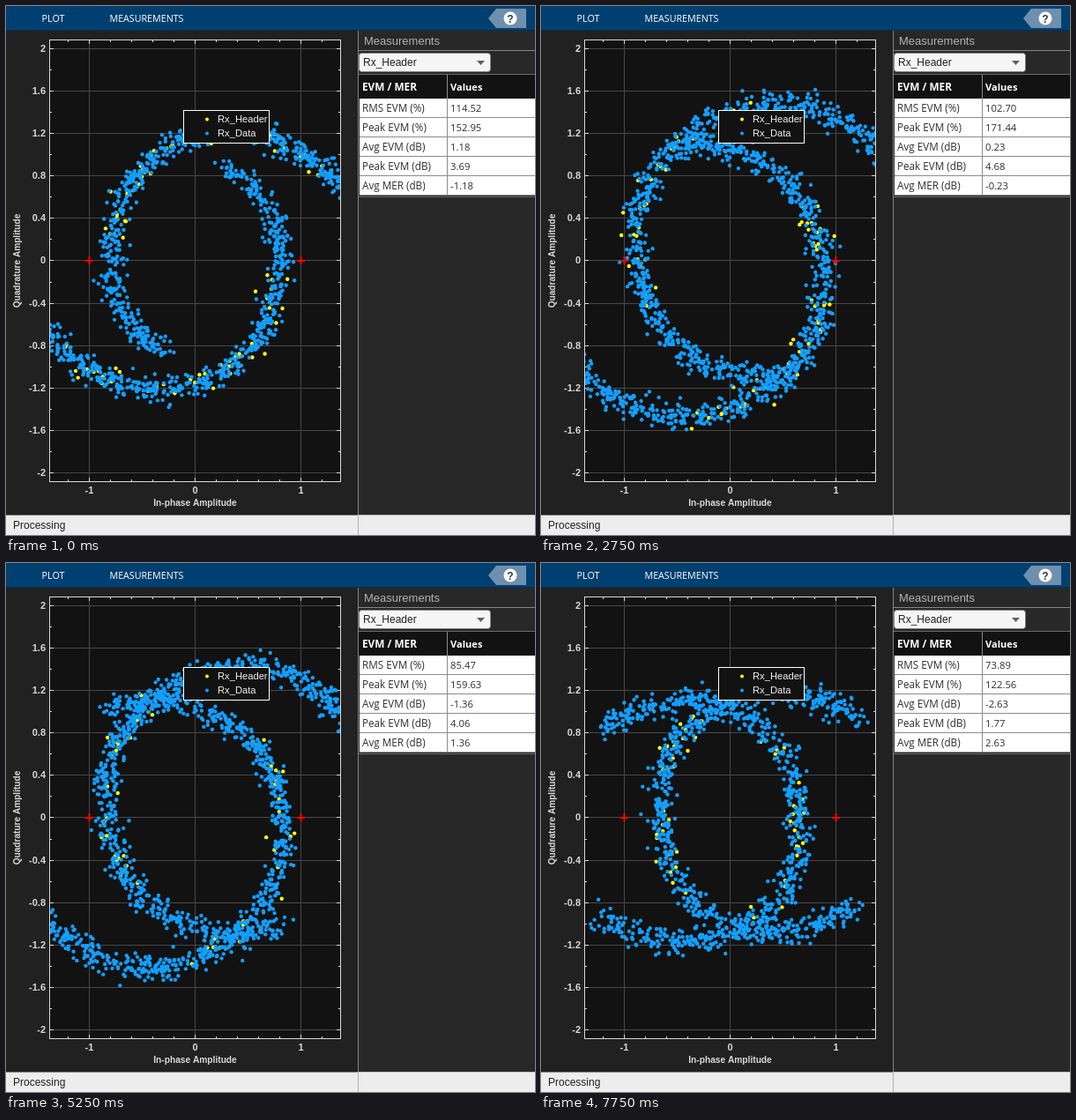
Write an HTML page with a canvas that moves like this. It is 600 by 600 pixels and loops after 8000 ms.

```html
<!DOCTYPE html>
<html lang="en">
<head>
<meta charset="utf-8">
<title>Constellation scope</title>
<style>
html, body { margin: 0; width: 100%; height: 100%; overflow: hidden; background: #282828; }
canvas { display: block; }
</style>
</head>
<body>
<canvas id="stage" width="600" height="600"></canvas>
<script>
const ctx = document.getElementById('stage').getContext('2d');
const ARIAL = '"Liberation Sans", Arial, sans-serif';
const UI = '"Open Sans", "Noto Sans", sans-serif';
const BLUE = '#139fff', YELLOW = '#ffff11', LIGHT = '#d9d9d9';
const STEP = 250, LOOP = 8000, BURST = 289;
const CX = 214.5, CY = 288.45, UNIT = 120.3;

// time, RMS EVM, peak EVM, last phase in degrees, then radii at 20, 60 ... 340 degrees
const KEYS = [
  [0,    114.52, 152.95, 253, 191, 162, 134, 107, 95, 103, 111, 130, 150],
  [1000, 112.47, 162.86, 275, 203, 179, 144, 115, 99, 104, 119, 138, 158],
  [2000, 108.53, 170.71, 288, 215, 190, 153, 122, 103, 107, 123, 145, 168],
  [3250, 98.81,  171.93, 302, 225, 201, 161, 128, 107, 108, 121, 147, 172],
  [4250, 90.98,  173.05, 303, 219, 197, 159, 125, 105, 106, 121, 150, 177],
  [6000, 81.34,  149.56, 316, 211, 185, 146, 112, 94, 99, 118, 149, 188],
  [7750, 73.89,  122.56, 325, 205, 160, 124, 95, 78, 88, 114, 148, 188]
];

function stateAt(time) {
  let i = 0;
  while (i < KEYS.length - 2 && time >= KEYS[i + 1][0]) i++;
  const a = KEYS[i], b = KEYS[i + 1];
  const k = (time - a[0]) / (b[0] - a[0]);
  const [, rms, peak, end, ...radii] = a.map((v, j) => v + (b[j] - v) * k);
  return { rms, peak, end, radii };
}

// Catmull-Rom through the radii
function radiusAt(radii, phase) {
  const u = (phase - 20) / 40;
  const i = Math.max(0, Math.min(radii.length - 2, Math.floor(u)));
  const f = u - i, p1 = radii[i], p2 = radii[i + 1];
  const p0 = radii[i - 1] ?? 2 * p1 - p2, p3 = radii[i + 2] ?? 2 * p2 - p1;
  return p1 + f / 2 * (p2 - p0 + f * (2 * p0 - 5 * p1 + 4 * p2 - p3 + f * (3 * (p1 - p2) + p3 - p0)));
}

function randomFrom(seed) {
  return () => {
    seed = (seed + 0x6D2B79F5) | 0;
    let h = Math.imul(seed ^ seed >>> 15, 1 | seed);
    h = h + Math.imul(h ^ h >>> 7, 61 | h) ^ h;
    return ((h ^ h >>> 14) >>> 0) / 4294967296;
  };
}

function rect(x, y, w, h, fill) {
  ctx.fillStyle = fill;
  ctx.fillRect(x, y, w, h);
}

function text(str, x, y, font, fill, align = 'left') {
  ctx.font = font;
  ctx.fillStyle = fill;
  ctx.textAlign = align;
  ctx.fillText(str, x, y);
}

function dot(x, y, fill, r = 2.2) {
  ctx.fillStyle = fill;
  ctx.beginPath();
  ctx.arc(x, y, r, 0, Math.PI * 2);
  ctx.fill();
}

function polygon(points, fill) {
  ctx.fillStyle = fill;
  ctx.beginPath();
  points.forEach(([x, y]) => ctx.lineTo(x, y));
  ctx.fill();
}

function drawToolbar() {
  rect(0, 0, 600, 28, '#004071');
  rect(0, 27, 600, 1, '#00305a');
  text('PLOT', 40.5, 18, '500 10.8px ' + UI, '#fff');
  text('MEASUREMENTS', 117.5, 18, '500 10.7px ' + UI, '#fff');
  polygon([[547, 14], [556, 3], [590, 3], [590, 25], [556, 25]], '#6f90ad');
  dot(572, 14, '#fff', 7.5);
  text('?', 572, 18.5, 'bold 12px ' + ARIAL, '#24394d', 'center');
}

function drawAxes() {
  rect(0, 28, 399, 549, '#212121');
  rect(49, 38, 331, 502, '#121212');
  for (let i = -5; i <= 5; i++) {
    const y = Math.round(CY - i * 0.4 * UNIT);
    rect(50, y, 329, 1, '#484848');
    rect(50, y, 4, 1, LIGHT);
    rect(375, y, 4, 1, LIGHT);
    if (i < 5) {
      rect(50, y - 24, 2, 1, LIGHT);
      rect(377, y - 24, 2, 1, LIGHT);
    }
    text(String(+(i * 0.4).toFixed(1)), 45, y + 4, 'bold 11px ' + ARIAL, LIGHT, 'right');
  }
  for (let i = -6; i <= 6; i++) {
    const x = 214 + i * 24, major = i % 5 === 0, length = major ? 4 : 2;
    if (major) {
      rect(x, 39, 1, 500, '#484848');
      text(String(i / 5), x + 0.5, 553, 'bold 11px ' + ARIAL, LIGHT, 'center');
    }
    rect(x, 39, 1, length, LIGHT);
    rect(x, 539 - length, 1, length, LIGHT);
  }
  ctx.strokeStyle = LIGHT;
  ctx.lineWidth = 1;
  ctx.strokeRect(49.5, 38.5, 330, 501);
  text('In-phase Amplitude', 214.5, 567, 'bold 10.2px ' + ARIAL, LIGHT, 'center');
  ctx.save();
  ctx.translate(16, 289);
  ctx.rotate(-Math.PI / 2);
  text('Quadrature Amplitude', 0, 0, 'bold 10.1px ' + ARIAL, LIGHT, 'center');
  ctx.restore();
}

function drawSignal({ end, radii }, step) {
  const random = randomFrom(step * 7919 + 11);
  const scatter = (count, last, span, color) => {
    for (let i = 0; i < count; i++) {
      const phase = last - span * random();
      const side = random() < 0.5 ? -1 : 1;
      const spread = 7.3 * Math.sqrt(-2 * Math.log(1 - random()));
      const turn = random() * Math.PI * 2;
      const r = radiusAt(radii, phase), angle = phase * Math.PI / 180;
      // thin out by radius for an even density along the arm
      if (phase < 14 || random() > r / 220) continue;
      dot(CX + side * r * Math.cos(angle) + spread * Math.cos(turn),
          CY - side * r * Math.sin(angle) + spread * Math.sin(turn), color);
    }
  };
  ctx.save();
  ctx.beginPath();
  ctx.rect(50, 39, 329, 500);
  ctx.clip();
  scatter(145, end - 80, 140, YELLOW);
  scatter(2600, end, BURST, BLUE);
  ctx.restore();
  for (const x of [94, 334]) {
    rect(x - 4, 288, 9, 2, '#f00');
    rect(x - 0.5, 284, 2, 9, '#f00');
  }
}

function drawLegend() {
  rect(201, 118, 98, 38, '#121212');
  ctx.strokeStyle = '#fff';
  ctx.strokeRect(201.5, 118.5, 97, 37);
  [['Rx_Header', YELLOW], ['Rx_Data', BLUE]].forEach(([name, color], i) => {
    dot(228, 128.5 + i * 16, color, 2);
    text(name, 240, 132 + i * 16, '11.2px ' + ARIAL, '#f0f0f0');
  });
}

function drawPanel({ rms, peak }) {
  rect(399, 28, 201, 549, '#282828');
  rect(399, 28, 1, 549, '#858585');
  text('Measurements', 406, 44, '13px ' + ARIAL, '#b3b3b3');
  rect(400, 50, 200, 1, '#858585');

  ctx.beginPath();
  ctx.roundRect(400.5, 53.5, 149, 21, 3);
  ctx.fillStyle = '#f5f5f5';
  ctx.fill();
  ctx.strokeStyle = '#7d7d7d';
  ctx.stroke();
  text('Rx_Header', 405, 68, '12px ' + ARIAL, '#212121');
  polygon([[534, 62], [543, 62], [538.5, 67]], '#616161');

  rect(400, 77, 200, 28, '#121212');
  rect(400, 77, 200, 1, '#6b6b6b');
  text('EVM / MER', 404, 96, 'bold 11.8px ' + UI, '#fff');
  text('Values', 504, 96, 'bold 11.1px ' + UI, '#fff');
  const decibels = percent => 20 * Math.log10(percent / 100);
  const rows = [
    ['RMS EVM (%)', rms],
    ['Peak EVM (%)', peak],
    ['Avg EVM (dB)', decibels(rms)],
    ['Peak EVM (dB)', decibels(peak)],
    ['Avg MER (dB)', -decibels(rms)]
  ];
  rows.forEach(([label, value], i) => {
    const y = 105 + i * 22;
    rect(401, y, 199, 22, '#fff');
    rect(401, y + 21, 199, 1, '#8c8c8c');
    text(label, 404, y + 15, '11.7px ' + UI, '#2f2f2f');
    text(value.toFixed(2), 504, y + 15, '11.3px ' + UI, '#2f2f2f');
  });
  rect(500, 78, 1, 137, '#8c8c8c');
  rect(400, 216, 200, 1, '#6b6b6b');
}

function drawStatus() {
  rect(0, 577, 600, 23, '#ededed');
  rect(0, 577, 399, 1, '#858585');
  rect(399, 577, 201, 1, '#c4c4c4');
  rect(399, 578, 1, 22, '#b0b0b0');
  text('Processing', 8, 593, '12px ' + ARIAL, '#212121');
}

let shown = -1;
function tick() {
  const step = Math.floor(performance.now() % LOOP / STEP);
  if (step !== shown) {
    shown = step;
    const state = stateAt(step * STEP);
    drawAxes();
    drawSignal(state, step);
    drawLegend();
    drawPanel(state);
    drawToolbar();
    drawStatus();
  }
  requestAnimationFrame(tick);
}
tick();
</script>
</body>
</html>
```
